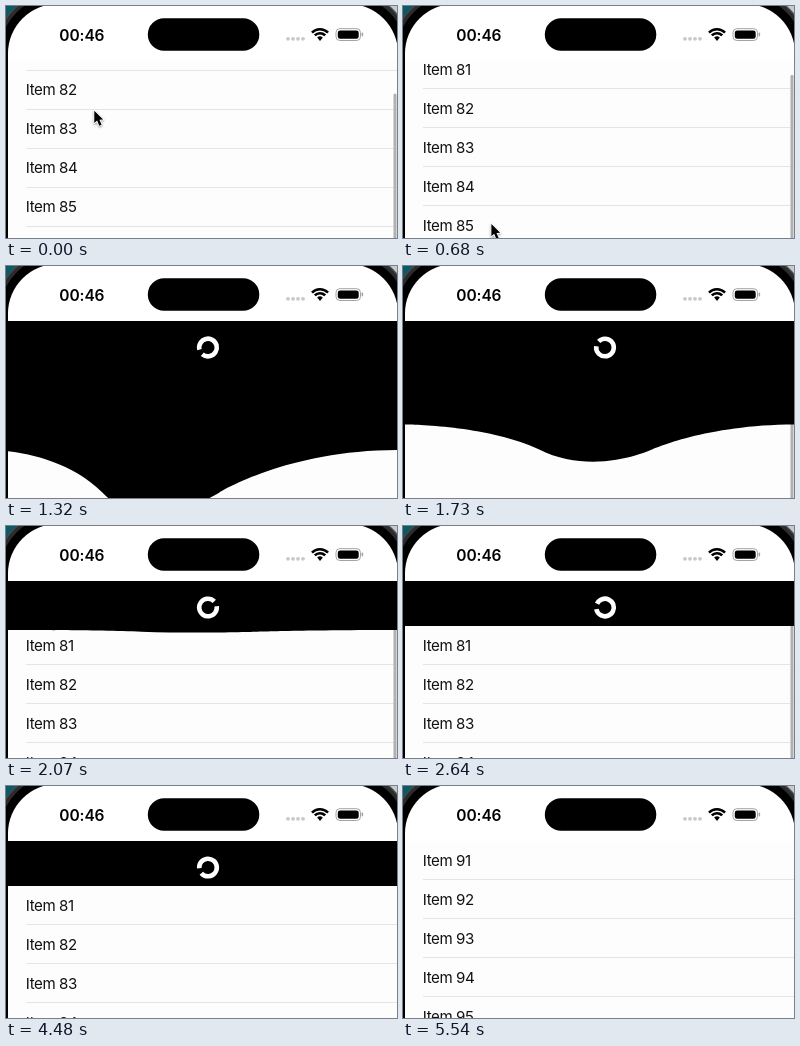
These frames come from a looping animation (391 by 232 pixels, 5560 ms). An HTML page with a canvas:

```html
<!DOCTYPE html>
<html lang="en">
<head>
<meta charset="utf-8">
<title>Elastic pull to refresh</title>
<style>
  html, body { margin: 0; width: 100%; height: 100%; overflow: hidden; background: #fff; }
  canvas { display: block; width: 391px; height: 232px; }
</style>
</head>
<body>
<canvas></canvas>
<script>
const W = 391, H = 232, LOOP = 5560;
const LEFT = 2, SCREEN_W = 390, TOP = 55, ROW = 39;
const LOADING = 45, MAX_PULL = 210, MAX_WAVE = 66, MIN_PULL = 85.5, SCROLLED = 29.6;
const DRAG = 600, DRAG_END = 1500, RELEASE = 1670, CLOSE = 4530;
const FONT = 'Inter, "Liberation Sans", sans-serif';

const canvas = document.querySelector('canvas');
const ctx = canvas.getContext('2d');
const ratio = window.devicePixelRatio || 1;
canvas.width = W * ratio;
canvas.height = H * ratio;

const clamp = (v, lo = 0, hi = 1) => Math.min(hi, Math.max(lo, v));
const progress = (t, from, to) => clamp((t - from) / (to - from));
const mix = (a, b, p) => a + (b - a) * p;
const easeInOut = p => (1 - Math.cos(p * Math.PI)) / 2;

// Underdamped spring going from 1 to 0.
function spring(ms) {
  const s = ms / 1000, decay = 8.2, freq = 16.2;
  return Math.exp(-decay * s) * (Math.cos(freq * s) + decay / freq * Math.sin(freq * s));
}

function pullAt(t) {
  const p = progress(t, DRAG, DRAG_END);
  return mix(-SCROLLED, MAX_PULL, Math.pow(Math.sin(p * Math.PI / 2), 1.3));
}

function touchX(t) {
  return 86 + 103 * Math.pow(progress(t, DRAG, DRAG_END), 3);
}

function listOffset(t) {
  if (t < RELEASE) return pullAt(t);
  if (t < CLOSE) return mix(MAX_PULL, LOADING, easeInOut(progress(t, RELEASE, RELEASE + 310)));
  return mix(LOADING, 0, easeInOut(progress(t, CLOSE - 30, 4810)));
}

function disc(x, y, r, color) {
  ctx.fillStyle = color;
  ctx.beginPath();
  ctx.arc(x, y, r, 0, Math.PI * 2);
  ctx.fill();
}

function pill(x, y, w, h, r, color) {
  ctx.fillStyle = color;
  ctx.beginPath();
  ctx.roundRect(x, y, w, h, r);
  ctx.fill();
}

function label(text, x, y, size, weight, spacing, color) {
  ctx.font = `${weight} ${size}px ${FONT}`;
  ctx.letterSpacing = spacing;
  ctx.fillStyle = color;
  ctx.fillText(text, x, y);
}

// The screen outline grown outwards on every side.
function shell(grow, color) {
  pill(LEFT - grow, -2 - grow, SCREEN_W + 2 * grow, 500, 49.5 + grow, color);
}

function drawPhone() {
  const back = ctx.createLinearGradient(0, 0, W, 0);
  back.addColorStop(0, '#0b5a68');
  back.addColorStop(0.5, '#0b5a68');
  back.addColorStop(0.5, '#c9c9c9');
  ctx.fillStyle = back;
  ctx.fillRect(0, 0, W, H);
  shell(13.5, '#46494b');
  shell(12, '#2a2c2d');
  shell(8.5, '#000');
  shell(0, '#fff');
}

function drawStatus() {
  label('00:46', 53.3, 34.8, 15.5, 600, '-0.1px', '#000');
  pill(141.8, 12.2, 111.5, 32.6, 16.3, '#000');
  for (let i = 0; i < 4; i++) disc(282 + i * 5, 32.8, 1.9, '#c8c8c8');

  ctx.strokeStyle = '#000';
  ctx.lineWidth = 2.6;
  for (const r of [11.2, 7.2]) {
    ctx.beginPath();
    ctx.arc(314, 34.4, r, -Math.PI * 0.755, -Math.PI * 0.245);
    ctx.stroke();
  }
  ctx.fillStyle = '#000';
  ctx.beginPath();
  ctx.moveTo(314, 35);
  ctx.arc(314, 34.4, 4, -Math.PI * 0.755, -Math.PI * 0.245);
  ctx.fill();

  ctx.strokeStyle = '#a3a3a3';
  ctx.lineWidth = 1;
  ctx.beginPath();
  ctx.roundRect(330, 22.7, 24.5, 11.8, 3.8);
  ctx.stroke();
  pill(331.8, 24.4, 20.9, 8.4, 2.4, '#000');
  pill(355.6, 26.6, 1.5, 4, 0.8, '#a3a3a3');
}

function drawList(t) {
  const first = t < CLOSE ? 81 : 91;
  const offset = listOffset(t);
  ctx.fillStyle = '#fdfdfd';
  ctx.fillRect(LEFT, TOP, SCREEN_W, H - TOP);
  for (let i = 0; i < 7; i++) {
    const y = 75 + offset + i * ROW;
    label(`Item ${first + i}`, 19.8, y + 5, 15.1, 400, '-0.42px', '#111');
    ctx.fillStyle = '#e5e5e6';
    ctx.fillRect(20, Math.floor(y + 18.8), W - 20, 1);
  }
}

function drawScrollbar(t) {
  const alpha = 1 - progress(t, 3440, 3800);
  if (!alpha) return;
  const pull = t < RELEASE ? pullAt(t) : 0;
  const top = 58 + Math.max(0, -pull);
  const bottom = 260 - 1.2 * Math.max(0, pull);
  if (bottom <= top) return;
  ctx.globalAlpha = alpha;
  pill(387.5, top, 3, bottom - top, 1.5, '#b0b0b0');
  ctx.globalAlpha = 1;
}

function drawWave(base, wave, x) {
  const lean = (x - SCREEN_W / 2) * 0.28;
  const minX = Math.min(lean, 0), maxX = SCREEN_W + Math.max(lean, 0);
  const left = x - minX, right = maxX - x;
  const shoulder = base + wave * 0.64;
  const x1 = minX + left * 0.71, x2 = maxX - right * 0.71;
  ctx.save();
  ctx.translate(LEFT, TOP);
  ctx.fillStyle = '#000';
  ctx.beginPath();
  ctx.moveTo(minX, 0);
  ctx.lineTo(minX, base);
  ctx.bezierCurveTo(minX, base, minX + left * 0.44, base, x1, shoulder);
  ctx.bezierCurveTo(x, base + wave * 1.36, x2, shoulder, x2, shoulder);
  ctx.bezierCurveTo(x2, shoulder, maxX - right * 0.44, base, maxX, base);
  ctx.lineTo(maxX, 0);
  ctx.fill();
  ctx.restore();
}

function drawSpinner(t, pull) {
  const amount = pull / MIN_PULL;
  let degrees = Math.max(0, amount - 1) * 200 - 90;
  if (t > RELEASE) degrees += (t - RELEASE) * 0.375;
  const start = degrees * Math.PI / 180;
  ctx.strokeStyle = '#fff';
  ctx.lineWidth = 4.6;
  ctx.beginPath();
  ctx.arc(202, TOP + Math.min(pull / 2, 26.5), 8.8, start, start + Math.min(amount, 1) * 0.9 * Math.PI * 2);
  ctx.stroke();
}

function drawHeader(t) {
  const pull = pullAt(t);
  if (pull <= 0 || t >= CLOSE) return;
  const wave = Math.min(pull * 1.6 / 3, MAX_WAVE);
  const base = pull - wave;
  const s = t < RELEASE ? 1 : spring(t - RELEASE);
  drawWave(t < RELEASE ? base : mix(LOADING, base, s), wave * s, touchX(t));
  drawSpinner(t, pull);
}

function drawCursor(t) {
  const move = clamp(Math.ceil((t - 149) / 60) / 3);
  const x = t < DRAG ? 88.3 : touchX(t) + 2.3;
  const y = mix(104.7, 188, move) + (pullAt(t) + SCROLLED) * 1.6;
  if (y > H || t >= RELEASE) return;
  ctx.save();
  ctx.translate(x, y);
  ctx.scale(0.85, 0.85);
  ctx.beginPath();
  for (const [px, py] of [[0, 0], [0, 14.5], [3.3, 11.6], [5.9, 17.6], [8.6, 16.4], [6, 10.6], [10.4, 10.4]]) ctx.lineTo(px, py);
  ctx.closePath();
  ctx.strokeStyle = '#fff';
  ctx.lineWidth = 2;
  ctx.lineJoin = 'round';
  ctx.shadowColor = 'rgba(0,0,0,.4)';
  ctx.shadowBlur = 2 * ratio;
  ctx.shadowOffsetY = ratio;
  ctx.stroke();
  ctx.shadowColor = 'transparent';
  ctx.fillStyle = '#000';
  ctx.fill();
  ctx.restore();
}

function draw(t) {
  ctx.setTransform(ratio, 0, 0, ratio, 0, 0);
  drawPhone();
  ctx.save();
  ctx.beginPath();
  ctx.rect(LEFT, TOP, SCREEN_W, H - TOP);
  ctx.clip();
  drawList(t);
  drawScrollbar(t);
  drawHeader(t);
  ctx.restore();
  drawStatus();
  drawCursor(t);
}

const began = performance.now();
function tick() {
  draw((performance.now() - began) % LOOP);
  requestAnimationFrame(tick);
}
tick();
</script>
</body>
</html>
```
